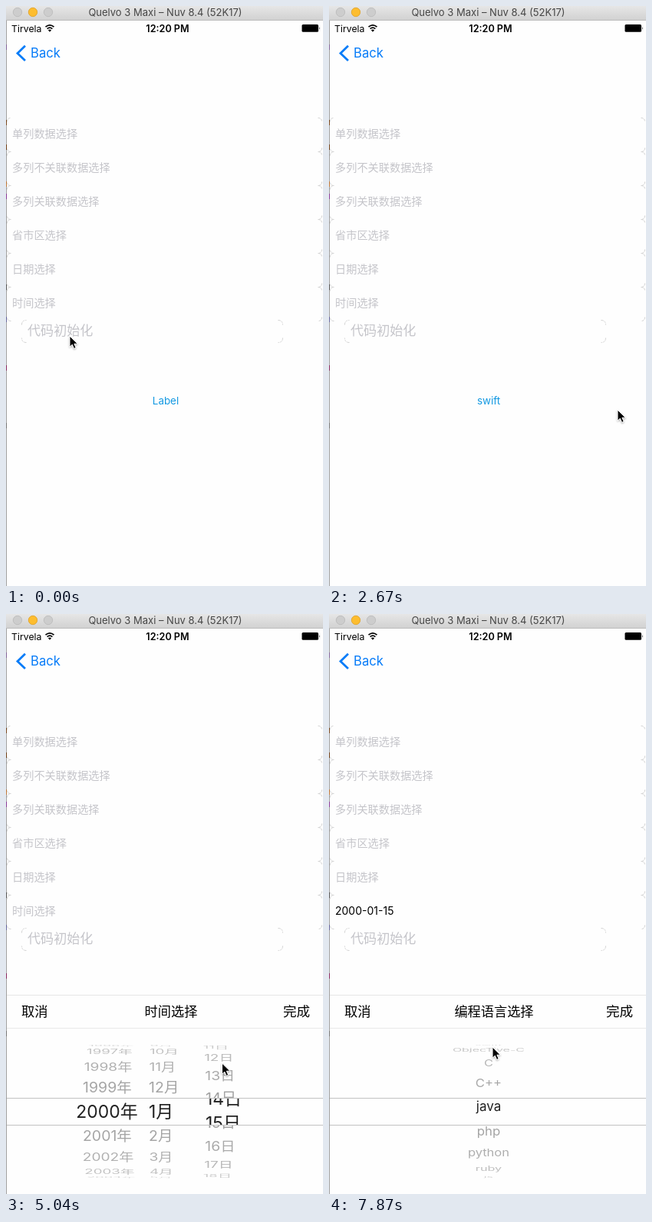
Animation, 413 px wide and 754 px high, one loop 8000 ms. Source, as an HTML page:

```html
<!DOCTYPE html>
<html lang="zh">
<head>
<meta charset="utf-8">
<style>
  html, body { margin: 0; width: 100%; height: 100%; overflow: hidden; background: #fefefe; }
  svg { display: block; width: 413px; height: 754px; }
  text { font-family: Inter, "Noto Sans CJK SC", "Noto Sans CJK", sans-serif; white-space: pre; }
</style>
</head>
<body>
<svg id="stage" viewBox="0 0 413 754" xmlns="http://www.w3.org/2000/svg">
  <defs>
    <linearGradient id="bar" x2="0" y2="1">
      <stop stop-color="#e6e6e6"/><stop offset="1" stop-color="#d1d1d1"/>
    </linearGradient>
    <clipPath id="band"><rect y="630" width="413" height="34"/></clipPath>
    <clipPath id="rim"><path d="M0 557H413V629H0ZM0 665H413V735H0Z"/></clipPath>
    <filter id="soft" x="-50%" y="-50%" width="200%" height="200%">
      <feDropShadow dx="0" dy="1" stdDeviation="1" flood-opacity=".35"/>
    </filter>
  </defs>
  <rect width="413" height="754" fill="#fefefe"/>
  <g id="page"></g>
  <g id="picker"></g>
  <g id="frame"></g>
  <path id="cursor" d="M0 0V14.2L3.3 11.2L5.6 16.4L8.2 15.3L5.9 10.2H10.4Z"
        fill="#000" stroke="#fff" stroke-width="1" filter="url(#soft)"/>
</svg>
<script>
const LOOP = 8000, TICK = 148.3;
const CENTER_X = 206, CENTER_Y = 647, RADIUS = 86, STEP = 21.5 * Math.PI / 180;
const $ = id => document.getElementById(id);

const label = (s, x, y, size, fill = '#000', anchor = 'start', extra = '') =>
  `<text x="${x}" y="${y + size * .36}" font-size="${size}" fill="${fill}" text-anchor="${anchor}" ${extra}>${s}</text>`;
const line = (y, color) => `<path d="M1 ${y}H413" stroke="${color}"/>`;
const corners = (x, y, w, h, r) => {
  const X = x + w, Y = y + h;
  return `<path d="M${x} ${y + r}Q${x} ${y} ${x + r} ${y}M${X - r} ${y}Q${X} ${y} ${X} ${y + r}` +
    `M${X} ${Y - r}Q${X} ${Y} ${X - r} ${Y}M${x + r} ${Y}Q${x} ${Y} ${x} ${Y - r}"
    fill="none" stroke="#d2d2d2" stroke-dasharray="3 1"/>`;
};

// Keys are [tick, values...]; linear between neighbouring keys.
function track(keys, k) {
  let i = 0;
  while (i < keys.length - 1 && keys[i + 1][0] <= k) i++;
  const a = keys[i], b = keys[i + 1] || a;
  const u = b === a || k < a[0] ? 0 : (k - a[0]) / (b[0] - a[0]);
  return a.slice(1).map((v, j) => v + (b[j + 1] - v) * u);
}

const cursorKeys = [
  [0, 83, 429], [3, 92, 387], [5, 83, 419], [10, 83, 419], [11, 120, 432], [12, 230, 480],
  [13, 350, 533], [14, 372, 557], [15, 376, 525], [18, 376, 525], [19, 330, 500],
  [21, 140, 392], [22, 107, 378], [24, 107, 378], [25, 33, 384], [28, 33, 384],
  [31, 270, 680], [32, 283, 694], [33, 282, 645], [34, 281.5, 584], [35, 292, 566],
  [37, 380, 524], [38, 385, 520], [41, 385, 520], [44, 140, 190], [45, 112, 171],
  [49, 112, 171], [50, 170, 400], [51, 213, 692], [52, 213, 640], [53, 213, 563]
];
const dayKeys = [[32, 11], [33, 12.6], [34, 14.55], [35, 15]];
const languageKeys = [[51, 0], [52, 1.7], [53, 4.21]];

const languages = ['swift', 'ObjecTive-C', 'C', 'C++', 'java', 'php', 'python', 'ruby', 'js'];
const wrap = (n, max) => ((n - 1) % max + max) % max + 1;

const languageColumn = pos => ({ pos, x: CENTER_X + 2, anchor: 'middle', size: 16.8, big: 17,
                                 name: i => languages[i] || '' });
const dateColumn = (pos, x, anchor, name) => ({ pos, x, anchor, name, size: 19.6, big: 23 });

const sheets = [
  { from: 8, to: 17, title: '测试代码', columns: () => [languageColumn(0)] },
  { from: 26, to: 41, title: '时间选择', columns: k => [
    dateColumn(2000, 131.5, 'middle', i => i + '年'),
    dateColumn(1, 186, 'start', i => wrap(i, 12) + '月'),
    dateColumn(track(dayKeys, k)[0], 260, 'start', i => wrap(i, 31) + '日')] },
  { from: 49, to: 99, title: '编程语言选择', columns: k => [languageColumn(track(languageKeys, k)[0])] }
];

function wheel({ pos, x, anchor, size, big, name }) {
  let rim = '', band = '';
  for (let i = Math.ceil(pos - 4.3); i <= pos + 4.3; i++) {
    const angle = (i - pos) * STEP, c = Math.max(Math.cos(angle), .05);
    const y = CENTER_Y + RADIUS * Math.sin(angle), sx = 1 - .08 * (1 - c);
    const place = `transform="translate(${CENTER_X} ${y}) scale(${sx} ${c}) translate(${-CENTER_X} 0)"`;
    rim += label(name(i), x, 0, size, '#9c9c9c', anchor, `opacity="${.35 + .6 * c}" ${place}`);
    if (Math.abs(i - pos) < 1.3) band += label(name(i), x, y, big, '#222', anchor);
  }
  return `<g clip-path="url(#rim)">${rim}</g><g clip-path="url(#band)">${band}</g>`;
}

function drawSheet(k) {
  const sheet = sheets.find(s => k >= s.from && k <= s.to);
  if (!sheet) return '';
  const shift = k === sheet.from ? 4 : k === sheet.to ? 253 : 0;
  return `<g transform="translate(0 ${shift})"><rect x="1" y="495" width="412" height="264" fill="#fefefe"/>` +
    line(495.5, '#e6e6e6') + line(538.5, '#e9e9e9') +
    label('取消', 20, 517, 17.3) + label(sheet.title, 215, 517, 17.2, '#000', 'middle') +
    label('完成', 361, 517, 17.6) +
    sheet.columns(k).map(wheel).join('') +
    line(629.5, '#c2c2c2') + line(664.5, '#c2c2c2') + '</g>';
}

function drawPage(k) {
  const hints = ['单列数据选择', '多列不关联数据选择', '多列关联数据选择', '省市区选择', '日期选择', '时间选择'];
  return hints.map((hint, i) => {
    const y = 166 + 44 * i;
    const picked = i === 5 && k >= 41;
    return corners(1.5, y - 20.5, 410, 44, 5) +
      label(picked ? '2000-01-15' : hint, 8, y, picked ? 14 : 14.2, picked ? '#000' : '#c5c5ca');
  }).join('') +
    corners(20.5, 408.5, 340, 29, 6) + label('代码初始化', 28, 422, 17.1, '#c5c5ca') +
    label(k < 17 ? 'Label' : 'swift', 208, 513, 13.4, '#1499e2', 'middle');
}

function drawFrame() {
  const lights = [[15, '#cdcdcd', '#b9b9b9'], [35, '#fdbd2f', '#dfa023'], [55, '#cdcdcd', '#b9b9b9']]
    .map(([x, fill, rim]) => `<circle cx="${x}" cy="8" r="5.7" fill="${fill}" stroke="${rim}" stroke-width=".8"/>`).join('');
  const specks = [[50, '#84659a'], [148, '#7a4a20'], [180, '#704018'], [228, '#c07838'], [244, '#8a3a9a'],
                  [362, '#555'], [404, '#6868a0'], [467, '#8a2860'], [542, '#777']]
    .map(([y, fill]) => `<rect y="${y}" width="1" height="7" fill="${fill}"/>`).join('');
  return '<rect width="413" height="18.5" fill="url(#bar)"/><path d="M0 18.5H413" stroke="#bcbcbc"/>' + lights +
    label('Quelvo 3 Maxi – Nuv 8.4 (52K17)', 207.5, 8.5, 13, '#454545', 'middle') +
    '<rect y="19" width="1" height="735" fill="#a0a0a0"/>' + specks +
    label('Tirvela', 7, 29.5, 12.3) + label('12:20 PM', 210.5, 29.5, 12.6, '#000', 'middle', 'font-weight="600"') +
    `<g fill="none" stroke="#000" stroke-width="1.7">
      <path d="M51.5 27.2Q57 22.4 62.5 27.2M53.6 29.7Q57 26.7 60.4 29.7"/></g>
    <path d="M54.9 31.3Q57 29.7 59.1 31.3L57 33.7Z"/>
    <rect x="385.5" y="24" width="21.5" height="9.8" rx="1.5"/><path d="M408 27Q409.5 29 408 31Z"/>
    <path d="M25 51.8L15 61.4L25 71" fill="none" stroke="#087cf8" stroke-width="2.8"/>` +
    label('Back', 32, 61.2, 16.7, '#087cf8');
}

$('frame').innerHTML = drawFrame();
let shown = -1;

function render(time) {
  const k = Math.min(53, Math.floor((time % LOOP + 6) / TICK));
  if (k !== shown) {
    shown = k;
    $('page').innerHTML = drawPage(k);
    $('picker').innerHTML = drawSheet(k);
    $('cursor').setAttribute('transform', `translate(${track(cursorKeys, k)})`);
  }
}

const start = performance.now();
function loop() {
  render(performance.now() - start);
  requestAnimationFrame(loop);
}
loop();
</script>
</body>
</html>
```
